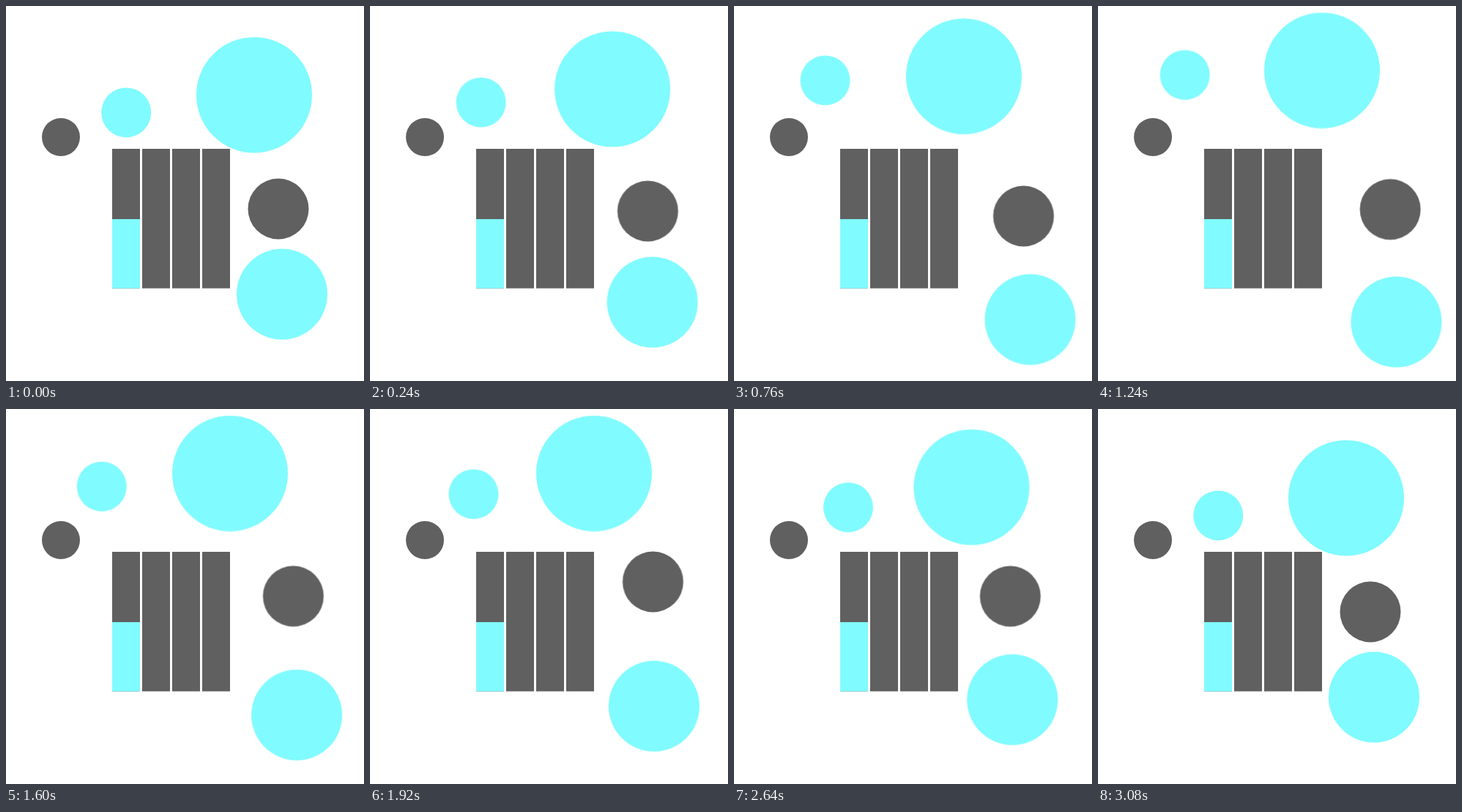
An HTML page that plays this animation: 489 px wide and 512 px high, repeating every 3180 ms.

```html
<!DOCTYPE html>
<html lang="en">
<head>
<meta charset="utf-8">
<title>Bars and bubbles</title>
<style>
  html, body { margin: 0; width: 100%; height: 100%; overflow: hidden; background: #fff; }
  svg { display: block; width: 489px; height: 512px; }
  .dark { fill: #606060; }
  .cyan { fill: #80fbff; }

  /* Three one-second legs at 25 steps each, with a short rest after each leg.
     The 1 ms lead keeps step edges clear of exact 40 ms marks. */
  .move { animation: drift 3180ms steps(25, end) -1ms infinite; }
  @keyframes drift {
    0%, 96.8553%, 100% { transform: translate(0, 0); }
    31.4465%, 32.7044% { transform: translate(var(--x1), var(--y1)); }
    64.1509%, 65.4088% { transform: translate(var(--x2), var(--y2)); }
  }

  .big   { --x1: -33px;   --y1: -33.5px; --x2: -33px;   --y2: -33.5px; }
  .small { --x1: -52.2px; --y1: -57.8px; --x2: -18.7px; --y2: -25.4px; }
  .mid   { --x1: 30.9px;  --y1: 13px;    --x2: 12.2px;  --y2: -48.4px; }
  .low   { --x1: 36.2px;  --y1: 45.4px;  --x2: 7.5px;   --y2: 7.7px; }
</style>
</head>
<body>
<svg viewBox="0 0 489 512">
  <g class="dark">
    <rect x="145" y="195" width="38" height="190.5"/>
    <rect x="186" y="195" width="38" height="190.5"/>
    <rect x="227" y="195" width="38" height="190.5"/>
    <rect x="268" y="195" width="38" height="190.5"/>
    <circle cx="75" cy="179" r="26"/>
  </g>
  <rect class="cyan" x="145" y="291" width="38" height="94.5"/>
  <circle class="cyan move big" cx="339" cy="121.5" r="79"/>
  <circle class="cyan move small" cx="164.2" cy="145.4" r="34"/>
  <circle class="dark move mid" cx="372" cy="277" r="41.5"/>
  <circle class="cyan move low" cx="377" cy="393.5" r="62"/>
</svg>
</body>
</html>
```
